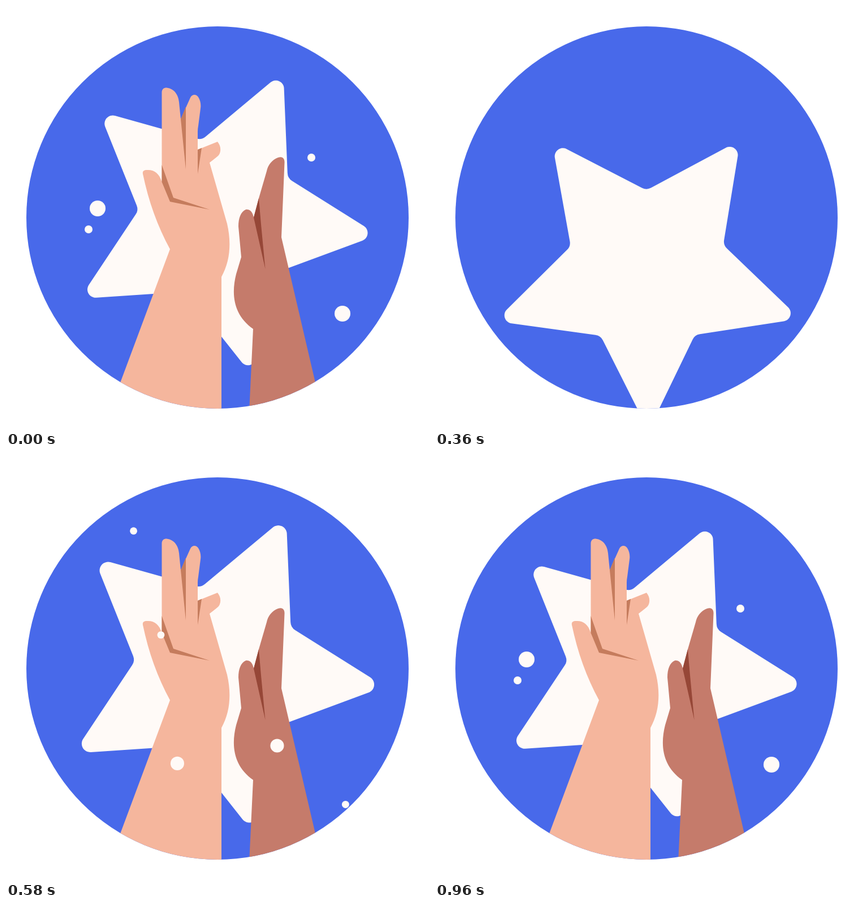
An HTML page with a canvas for the animation above (1.2 s loop, 748x748 px).

```html
<!DOCTYPE html>
<html lang="en">
<head>
<meta charset="utf-8">
<title>High five</title>
<style>
  html, body { margin: 0; height: 100%; overflow: hidden; background: #fff; }
  canvas { display: block; width: 100vw; height: 100vh; }
</style>
</head>
<body>
<canvas id="stage" width="748" height="748"></canvas>
<script>
const ctx = document.getElementById('stage').getContext('2d');
const LOOP = 1200;
const STEP = 200 / 9; // 45 pictures per second
const BLUE = '#4869ea', CREAM = '#fffaf7';

const lightHand = {
  color: '#f5b69d', shade: '#c57c5d',
  from: [-138, 124], power: 2,
  shape: new Path2D(`M242 297C241 292 244 290 249 290C262 289 271 296 275.5 311V153
    C275.5 147 279 144.5 284 144.5C298 146 305 158 306 170L309 200L326 162
    C329 156 336 155 340 161C344 167 345 175 344 181L340 212Q339 217 339 222V254
    L374 240C380 247 381 257 376 264Q373 267 360 277L391 385
    C399 420 396 452 381 479V760H167L290 430C268 390 252 345 242 297Z`),
  folds: new Path2D(`M318 178L309 200L318 289ZM339 254L346 251L339 297Z
    M275.5 281L296 339L360 360L290 346L275.5 311Z`)
};
const darkHand = {
  color: '#c57b6b', shade: '#964737',
  from: [118.5, 81], power: 3,
  shape: new Path2D(`M492.5 277C493 268 487 266 481 268C470 272 463 282 461 292
    L447 340L438 374C436 363 430 359 424 360C415 364 411 375 411 390L416 444
    L407 474C398 510 402 546 437 571L428 760H569L487 409Z`),
  folds: new Path2D('M447 340L451 386L458.5 465L438 374Z')
};

// Resting dots: x, y, radius, time of appearance
const dots = [
  [540, 268, 7, 580], [162, 358, 14, 670], [146, 395, 7, 750], [595, 544, 14, 830]
];
// Sparks of the clap: direction and radius
const sparks = [
  [-68, -132, 7.5], [-48, -56, 7.5], [-36, 38, 14], [37, 25, 14], [87, 68, 7.5]
];

const span = (t, a, b) => Math.min(1, Math.max(0, (t - a) / (b - a)));
const smooth = p => p * p * (3 - 2 * p);

function disc(x, y, r, color) {
  ctx.fillStyle = color;
  ctx.beginPath();
  ctx.arc(x, y, Math.max(0, r), 0, Math.PI * 2);
  ctx.fill();
}

function drawStar(t) {
  const rest = 838 * (1 - span(t, 133, 520) ** 2) ** 5.5;
  const size = 1 + 0.125 * (smooth(span(t, 356, 446)) - smooth(span(t, 511, 622)));
  const corner = i => {
    const a = (i - 2.5) * Math.PI / 5 + Math.PI * 0.2;
    const r = i % 2 ? 141.8 : 283.6;
    return [r * Math.cos(a), r * Math.sin(a)];
  };
  ctx.save();
  ctx.translate(375.5 - rest * 0.003, 375.5 + rest);
  // Corner 0 points 36 degrees right of straight up
  ctx.rotate((rest * 0.1265 - 12.1) * Math.PI / 180);
  ctx.scale(size, size);
  ctx.rotate(-Math.PI * 0.0);
  ctx.beginPath();
  const [ax, ay] = corner(9), [bx, by] = corner(0);
  ctx.moveTo((ax + bx) / 2, (ay + by) / 2);
  for (let i = 0; i < 10; i++) {
    ctx.arcTo(...corner(i), ...corner(i + 1), i % 2 ? 17 : 14.5);
  }
  ctx.closePath();
  ctx.fillStyle = CREAM;
  ctx.fill();
  ctx.restore();
}

function drawHand(hand, t) {
  const clap = span(t, 444.4, 578);
  const [dx, dy] = hand.from;
  const rise = 420 * (1 - span(t, 355.5, 444.4)) ** 2;
  ctx.save();
  ctx.translate(dx * (1 - clap) ** hand.power, dy * (1 - smooth(clap)) + rise);
  ctx.fillStyle = hand.color;
  ctx.fill(hand.shape);
  ctx.fillStyle = hand.shade;
  ctx.fill(hand.folds);
  ctx.restore();
}

function drawSparks(t) {
  const p = span(t, 480, 640);
  if (p === 0 || p === 1) return;
  const reach = (1 - (1 - p) ** 2) / 0.351;
  for (const [x, y, r] of sparks) {
    disc(390 + x * reach, 450 + y * reach, r * (1 - p ** 4), CREAM);
  }
}

function drawDots(t) {
  for (const [x, y, r, start] of dots) {
    const p = span(t, start, start + 130);
    const pop = p < 0.6 ? 1.2 * smooth(p / 0.6) : 1.2 - 0.2 * smooth((p - 0.6) / 0.4);
    disc(x, y, r * pop, CREAM);
  }
}

function draw(t) {
  ctx.clearRect(0, 0, 748, 748);
  disc(374, 374, 338, BLUE);
  ctx.save();
  ctx.beginPath();
  ctx.arc(374, 374, 338, 0, Math.PI * 2);
  ctx.clip();
  drawStar(t);
  if (t > 360) {
    drawHand(lightHand, t);
    drawHand(darkHand, t);
  }
  drawSparks(t);
  drawDots(t);
  ctx.restore();
}

const begin = performance.now();
function tick() {
  const ms = (performance.now() - begin) % LOOP;
  const n = Math.floor((Math.floor(ms / 10) + 0.5) / STEP * 10);
  // The loop opens on the closing pose, then cuts to the empty disc
  draw(n < 6 ? LOOP : n * STEP);
  requestAnimationFrame(tick);
}
tick();
</script>
</body>
</html>
```
